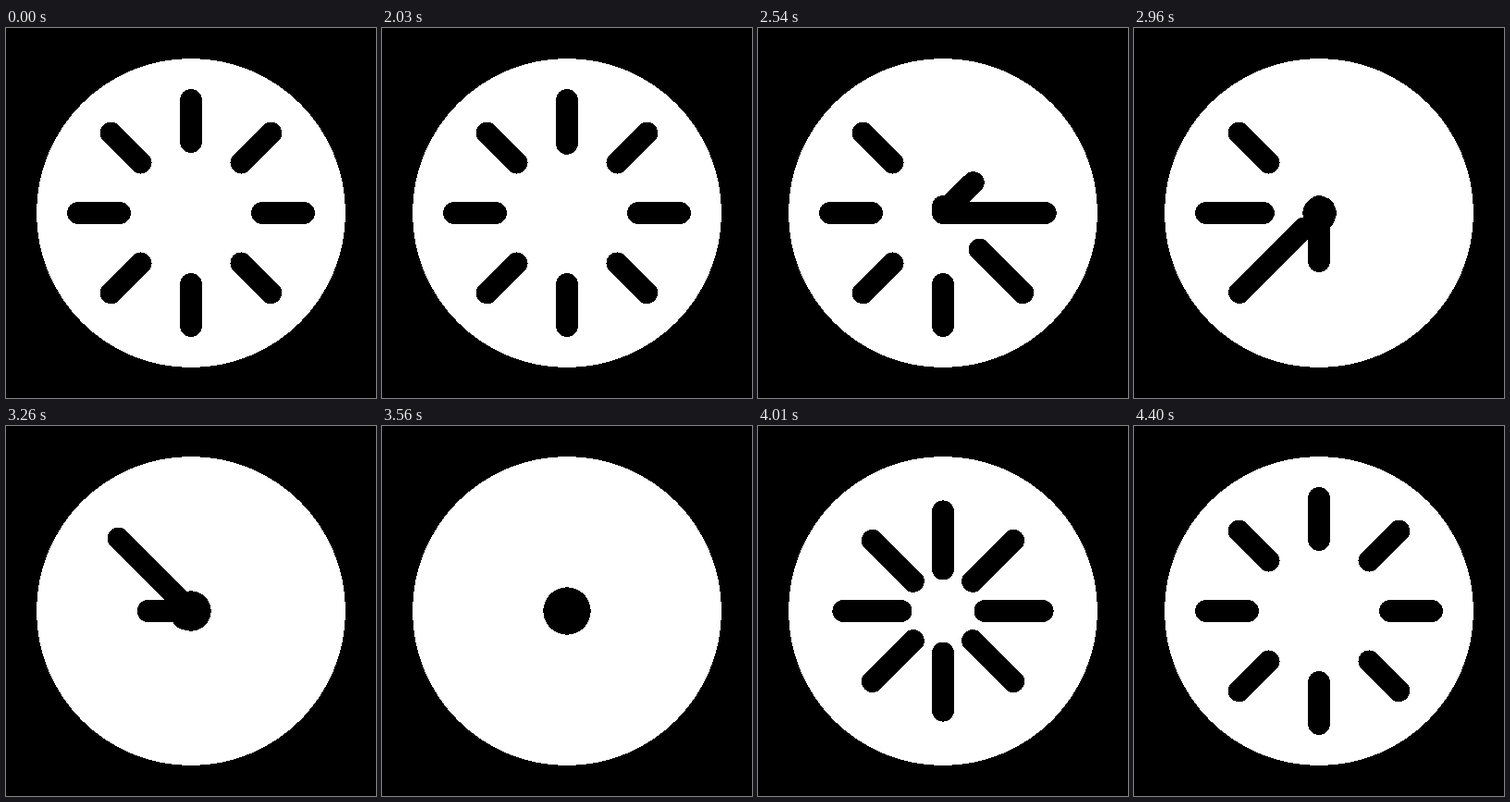
Recreate the animation shown at these times as an HTML page. Size 400x400 px, loop 4430 ms.

```html
<!DOCTYPE html>
<html lang="en">
<head>
<meta charset="utf-8">
<title>Spokes</title>
<style>
  html, body { margin: 0; width: 100%; height: 100%; overflow: hidden; background: #000; }
  svg { display: block; width: 100vw; height: 100vh; }
  line { stroke: #000; stroke-width: 24; stroke-linecap: round; }
</style>
</head>
<body>
<svg viewBox="-200 -200 400 400" shape-rendering="crispEdges">
  <circle r="167" fill="#fff"/>
  <g id="spokes"></g>
  <circle id="hub" r="0"/>
</svg>
<script>
const LOOP = 4430, REST = 2000, TICK = 30;
const STAGGER = 144, BURST = 3620, END = 4400;
const INNER = 77, OUTER = 122, STUB = 7;

const group = document.getElementById('spokes');
const hub = document.getElementById('hub');
const spokes = Array.from({ length: 8 }, (_, i) => {
  const line = document.createElementNS('http://www.w3.org/2000/svg', 'line');
  line.setAttribute('transform', `rotate(${i * 45})`);
  group.append(line);
  // the lower left spoke leaves a little late
  return { line, start: REST + i * STAGGER + (i === 5 ? 45 : 0) };
});

const span = (t, from, to) => Math.min(1, Math.max(0, (t - from) / (to - from)));
const mix = (a, b, k) => a + (b - a) * k;
const sine = x => (1 - Math.cos(Math.PI * x)) / 2;
const out = (x, power) => 1 - (1 - x) ** power;

function reach(t, start) {
  if (t >= BURST) {
    return [
      mix(0, INNER, out(span(t, BURST + 170, END), 2)),
      mix(STUB, OUTER, out(span(t, BURST, END), 3))
    ];
  }
  const v = t - start;
  return [
    mix(INNER, 0, sine(span(v, 0, 310))),
    mix(OUTER, STUB, sine(span(v, 179, 539)))
  ];
}

function hubRadius(t) {
  if (t < 2540) return 0;
  return t < BURST
    ? mix(12, 26, span(t, 2540, 3580))
    : mix(26, 0, span(t, BURST, BURST + 180));
}

function draw(t) {
  for (const { line, start } of spokes) {
    const [inner, outer] = reach(t, start);
    line.setAttribute('y1', -inner);
    line.setAttribute('y2', -outer);
  }
  hub.setAttribute('r', hubRadius(t));
}

const origin = performance.now();
function frame() {
  const t = (performance.now() - origin) % LOOP;
  const step = Math.floor((t - REST + 2) / TICK) * TICK;
  draw(step < TICK ? 0 : REST + step);
  requestAnimationFrame(frame);
}
frame();
</script>
</body>
</html>
```
